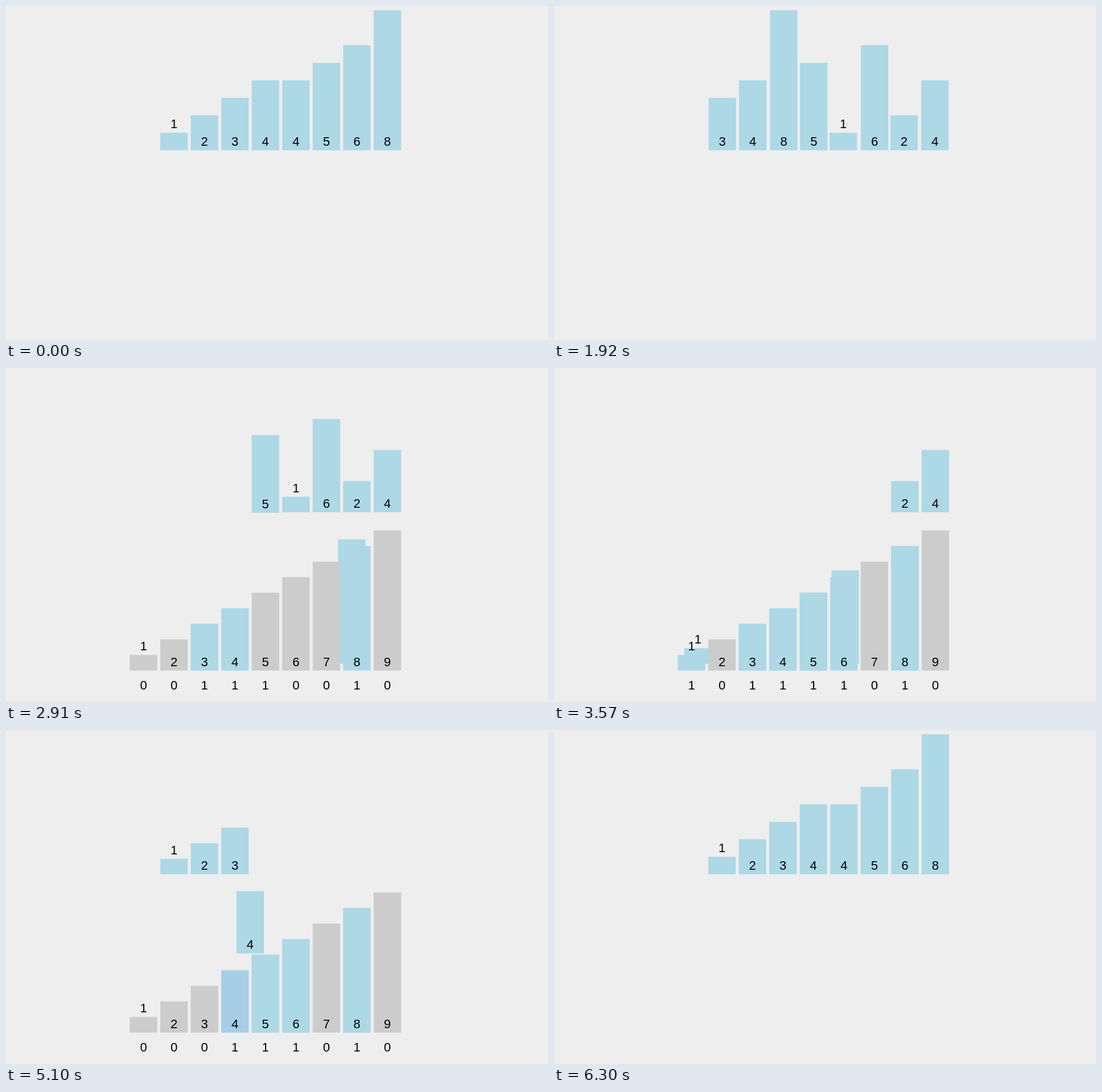
An HTML page with a canvas that plays this animation: 952 by 588 pixels, repeating every 7110 ms.

```html
<!DOCTYPE html>
<html lang="en">
<head>
<meta charset="utf-8">
<title>Counting sort</title>
<style>
  html, body { margin: 0; height: 100%; overflow: hidden; background: #eee; }
  canvas { display: block; }
</style>
</head>
<body>
<canvas id="stage" width="952" height="588"></canvas>
<script>
const ctx = document.getElementById('stage').getContext('2d');
const LOOP = 7110, TICK = 30, DURATION = 300;
const SHUFFLE = 1653, GROW = 1930, END = 6001;
const TOP = 254, BOTTOM = 532.6, COUNTS = 565.6, WIDTH = 48.2;
const FULL = 246.5;

const values = [1, 2, 3, 4, 4, 5, 6, 8];
const shuffled = [4, 6, 0, 1, 7, 3, 5, 2]; // slot of each value before sorting
// Eight moves down into the buckets, then eight back up
const starts = [2210, 2435, 2660, 2882, 3102, 3336, 3571, 3840,
                4116, 4396, 4672, 4950, 5101, 5319, 5536, 5754, END];
const levels = [[204, 204, 204], [173, 216, 230], [159, 197, 232]];

const mix = (a, b, p) => a + (b - a) * p;
const slotX = k => 217.4 + 53.55 * k;

function ease(u) {
  u = Math.max(0, Math.min(1, u));
  return u < .5 ? 4 * u ** 3 : 1 - 4 * (1 - u) ** 3;
}

// A move cut short by the next one rests just before its goal for one more step
function progress(i, t) {
  const cut = starts[i + 1] - starts[i] < 240 && t < starts[i + 2];
  return ease(Math.min((t - starts[i]) / DURATION, cut ? .78 : 1));
}

function levelColor(level) {
  const k = Math.min(1, Math.floor(level));
  const rgb = levels[k].map((c, j) => Math.round(mix(c, levels[k + 1][j], level - k)));
  return `rgb(${rgb})`;
}

function label(text, x, y) {
  ctx.fillStyle = '#000';
  ctx.fillText(text, x + WIDTH / 2, y);
}

function bar(value, x, bottom, unit, color, scale = 1) {
  const height = value * unit, top = bottom - height;
  ctx.fillStyle = color;
  ctx.fillRect(x, top, WIDTH * scale, height * scale);
  label(value, x, (value === 1 ? top : bottom) - 8);
}

function drawElements(t) {
  const mixed = ease((t - SHUFFLE) / DURATION);
  const shrink = ease((t - GROW) / DURATION) - ease((t - END) / DURATION);
  const unit = mix(FULL / 8, FULL / 9, shrink);
  values.forEach((value, i) => {
    const down = progress(shuffled[i], t), up = progress(8 + i, t);
    const home = slotX(i + 1);
    let x = mix(home, slotX(shuffled[i] + 1), mixed);
    x = mix(mix(x, slotX(value - 1), down), home, up);
    bar(value, x, mix(mix(TOP, BOTTOM, down), TOP, up), unit, levelColor(1));
  });
}

function drawBuckets(t) {
  if (t < GROW || t >= END) return;
  const scale = ease((t - GROW) / DURATION);
  for (let k = 1; k <= 9; k++) {
    let level = 0, count = 0;
    values.forEach((value, i) => {
      if (value !== k) return;
      const down = shuffled[i], up = 8 + i;
      level += progress(down, t) - progress(up, t);
      count += (t >= starts[down]) - (t >= starts[up]);
    });
    const x = slotX(k - 1);
    bar(k, x, BOTTOM, FULL / 9, levelColor(Math.max(0, level)), scale);
    label(count, x, COUNTS);
  }
}

function draw(now) {
  const t = Math.floor(now % LOOP / TICK) * TICK;
  ctx.fillStyle = '#eee';
  ctx.fillRect(0, 0, 952, 588);
  ctx.font = '22px "Liberation Sans", Arial, sans-serif';
  ctx.textAlign = 'center';
  drawElements(t);
  drawBuckets(t);
  requestAnimationFrame(draw);
}
requestAnimationFrame(draw);
</script>
</body>
</html>
```
